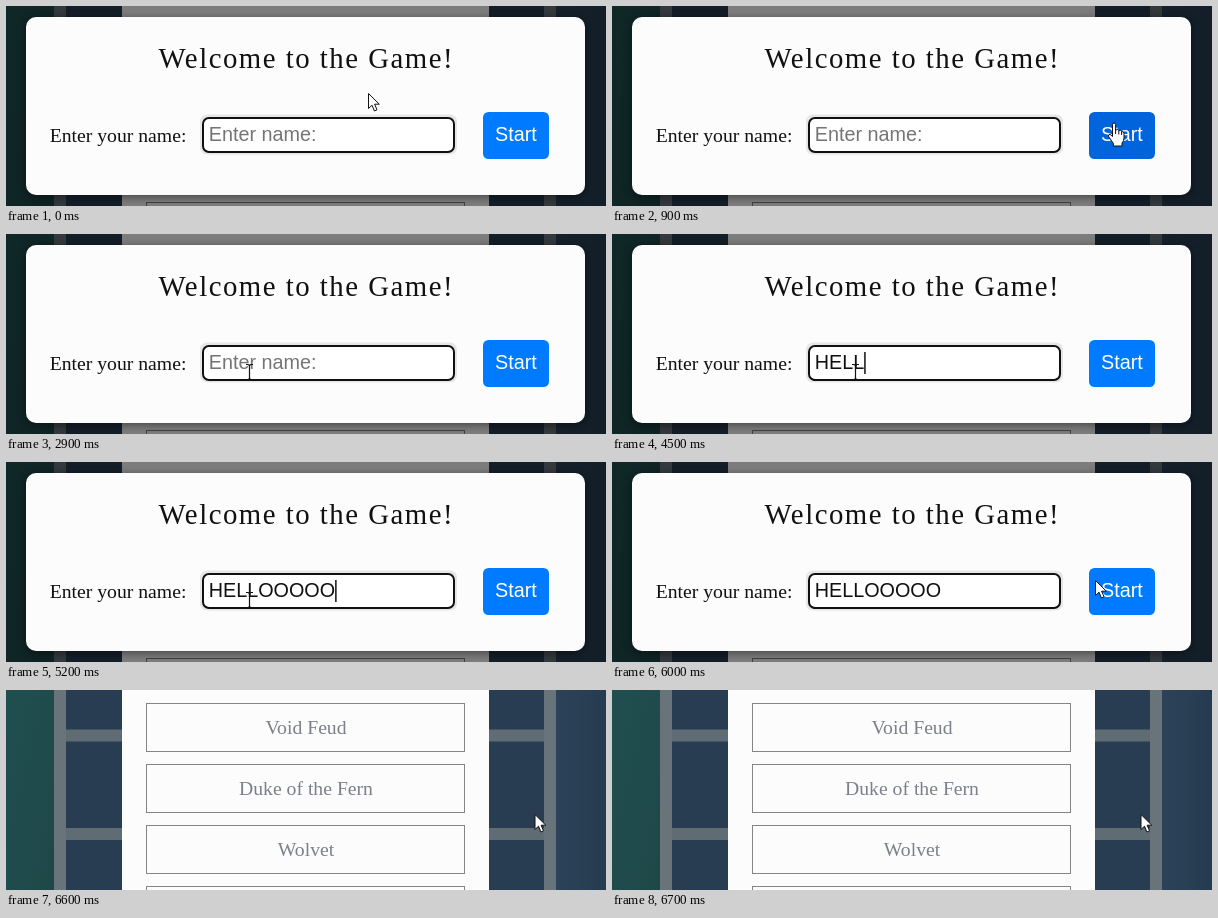
An HTML page that plays this animation: 600x200 px, repeating every 6.8 s.

```html
<!DOCTYPE html>
<html lang="en">
<head>
<meta charset="utf-8">
<title>Welcome dialog</title>
<style>
  html, body { margin: 0; width: 100%; height: 100%; overflow: hidden; background: #263e54; }
  svg { display: block; width: 600px; height: 200px; }
  text { white-space: pre; }
  .serif { font-family: "Liberation Serif", "Times New Roman", serif; font-size: 19.7px; fill: #111; }
  .sans { font-family: "Liberation Sans", Arial, sans-serif; font-size: 19.8px; }
  .title { font-size: 28.8px; letter-spacing: 1.5px; }
  .option { fill: #7c808a; text-anchor: middle; }
  #dialog { filter: drop-shadow(0 2px 4px rgba(0,0,0,.45)); }
  #hand path, #arrow path { fill: #fff; stroke: #111; stroke-linejoin: round; }
</style>
</head>
<body>
<svg viewBox="0 0 600 200">
  <defs>
    <linearGradient id="teal" x2="1" y2="1">
      <stop offset="0" stop-color="#204f50"/><stop offset="1" stop-color="#1f4748"/>
    </linearGradient>
    <linearGradient id="navy" x2="1" y2="0">
      <stop offset="0" stop-color="#2b4258"/><stop offset="1" stop-color="#253c50"/>
    </linearGradient>
  </defs>

  <rect width="48" height="200" fill="url(#teal)"/>
  <rect x="60" width="478" height="200" fill="#283c52"/>
  <rect x="550" width="50" height="200" fill="url(#navy)"/>
  <path d="M60 45.5H538M60 144H538" stroke="#5f6c74" stroke-width="12"/>
  <path d="M54 0V200M544 0V200" stroke="#69737a" stroke-width="12"/>
  <rect x="116" width="367" height="200" fill="#fcfcfc"/>
  <g id="options"></g>

  <g id="modal">
    <rect width="600" height="200" opacity=".5"/>
    <rect id="dialog" x="20" y="11" width="559" height="178" rx="10" fill="#fcfcfc"/>
    <text class="serif title" x="152.5" y="62">Welcome to the Game!</text>
    <text class="serif" x="43.7" y="135.5">Enter your name:</text>
    <rect id="halo" x="194" y="108.5" width="257" height="40" rx="7" fill="#e6e6e6"/>
    <rect id="field" x="197" y="112" width="251" height="34" rx="6" fill="#fff"/>
    <text id="value" class="sans" x="202.7" y="135.3"></text>
    <rect id="caret" y="118" width="1.5" height="22" fill="#111"/>
    <rect id="button" x="477" y="106" width="66" height="47" rx="5.5"/>
    <text class="sans" x="489" y="135.3" fill="#fff">Start</text>
  </g>

  <g id="arrow"><path d="M.5 .5V15.5L4 12.2L6.4 18L9 16.8L6.6 11.2H11.3Z"/></g>
  <g id="beam"><path d="M-3 -7.5H-.8L.5 -6.5L1.8 -7.5H4M.5 -6.5V6.5M-3 7.5H-.8L.5 6.5L1.8 7.5H4" fill="none" stroke="#111" stroke-width="1.2"/></g>
  <g id="hand"><path d="M-1.5 1.5Q-1.5 0 0 0T1.6 1.5V7Q4.2 5.8 4.8 7.7Q7 6.6 7.6 8.7Q10 8 10 10.6V15Q10 18 8 20V23H-.6V20.5L-5.4 13.5Q-6 11.4 -4 11.3L-1.5 13.5Z"/><path d="M1.6 7V11M4.8 8V11.5M7.6 9V12"/></g>
</svg>
<script>
const LOOP = 6800, STEP = 100, FIRST_KEY = 3900, BLUR = 6500, CLICK = 6600;
const NAME = "HELLOOOOO";
const keyTimes = [3900, 4100, 4300, 4500, 4700, 4800, 4900, 5100, 5200];
// Pointer stops: time, x, y
const stops = [
  [0, 362, 87], [700, 508, 86], [900, 502, 117], [1900, 502, 117],
  [2500, 243, 138], [5400, 243, 138], [6000, 483, 118], [6300, 528.5, 124], [LOOP, 528.5, 124]
];
const $ = id => document.getElementById(id);
const set = (id, attrs) => Object.entries(attrs).forEach(([k, v]) => $(id).setAttribute(k, v));
const show = (id, on) => set(id, { visibility: on ? "visible" : "hidden" });

$("options").innerHTML = ["Void Feud", "Duke of the Fern", "Wolvet", ""].map((label, i) => {
  const y = 13.5 + i * 61;
  return `<rect x="140.5" y="${y}" width="318" height="48" fill="none" stroke="#858585"/>
    <text class="serif option" x="300" y="${y + 30.5}">${label}</text>`;
}).join("");

function pointerAt(t) {
  const i = stops.findIndex(s => s[0] > t);
  const [t0, x0, y0] = stops[i - 1], [t1, x1, y1] = stops[i];
  const p = (t - t0) / (t1 - t0), e = p * p * (3 - 2 * p);
  return [x0 + (x1 - x0) * e, y0 + (y1 - y0) * e];
}

function caretOn(t) {
  if (t >= BLUR) return false;
  if (t < FIRST_KEY) return t % 1000 >= 400 && t % 1000 < 900;
  return t < 5700 || t >= 6200;
}

function draw(t) {
  const open = t < CLICK, focused = t < BLUR;
  const [x, y] = pointerAt(t);
  const hover = open && x > 484 && y >= 106;
  const overField = open && x > 196 && x < 449 && y > 110 && y < 147;

  $("modal").style.display = open ? "" : "none";
  const typed = NAME.slice(0, keyTimes.filter(k => k <= t).length);
  const value = $("value");
  value.textContent = typed || "Enter name:";
  set("value", { fill: typed ? "#111" : "#757575" });
  show("caret", open && caretOn(t));
  set("caret", { x: 202.7 + (typed ? value.getComputedTextLength() : 0) });
  show("halo", open && focused);
  set("field", { stroke: focused ? "#101010" : "#b4b4b8", "stroke-width": focused ? 2 : 1.3 });
  set("button", { fill: hover ? "#0064dc" : "#007bff" });

  const shape = hover ? "hand" : overField ? "beam" : "arrow";
  for (const id of ["arrow", "beam", "hand"]) show(id, id === shape);
  set(shape, { transform: `translate(${x} ${y})` });
}

const start = performance.now();
function tick() {
  const t = (performance.now() - start) % LOOP;
  draw(Math.floor(t / STEP) * STEP);
  requestAnimationFrame(tick);
}
tick();
</script>
</body>
</html>
```
